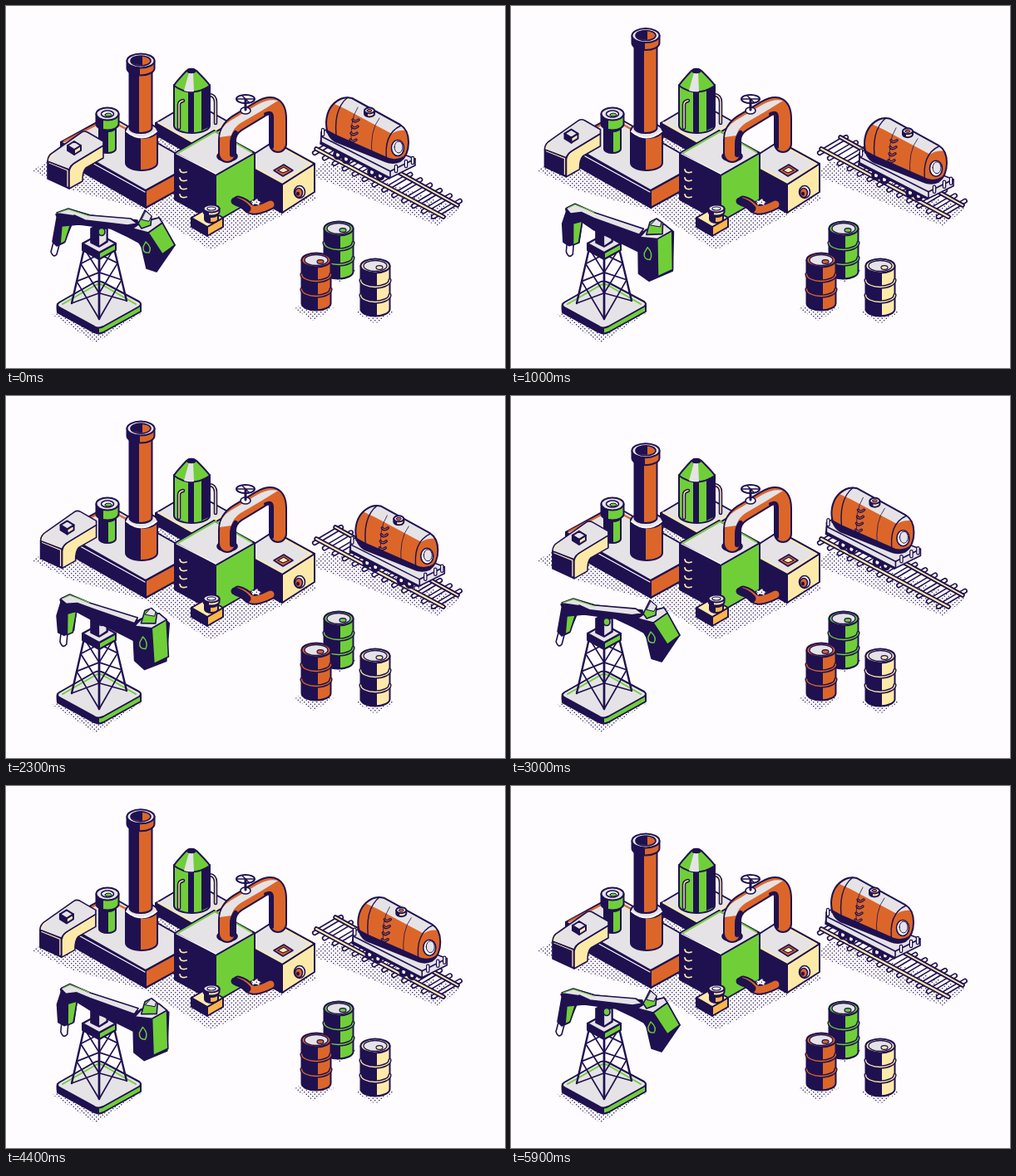
Animation, 600 px wide and 436 px high, one loop 6 s. Source, as an HTML page with a canvas:

```html
<!DOCTYPE html>
<html lang="en">
<head>
<meta charset="utf-8">
<title>Oil industry</title>
<style>
html, body { margin: 0; width: 100%; height: 100%; overflow: hidden; background: #fefcff; }
canvas { display: block; }
</style>
</head>
<body>
<canvas id="stage" width="600" height="436"></canvas>
<script>
const ctx = document.getElementById('stage').getContext('2d');
const BG = '#fefcff', NAVY = '#1f1150', ORANGE = '#dc6629', GREEN = '#70cf38',
      GREY = '#e5e3e6', CREAM = '#fdeaa9', AMBER = '#fbb54a', WHITE = '#fffdfd';
ctx.lineJoin = ctx.lineCap = 'round';

// Drawing helpers
function shape(path, fill, width = 1.6, color = NAVY) {
  const p = new Path2D(path);
  if (fill) { ctx.fillStyle = fill; ctx.fill(p); }
  if (width) { ctx.lineWidth = width; ctx.strokeStyle = color; ctx.stroke(p); }
}
const line = (path, width = 1.6, color = NAVY) => shape(path, null, width, color);

function tube(path, width, color, edge = 4) {
  line(path, width + edge);
  line(path, width, color);
}

function oval(x, y, rx, ry, fill, width = 1.6) {
  shape(`M${x - rx} ${y}a${rx} ${ry} 0 1 0 ${2 * rx} 0a${rx} ${ry} 0 1 0 ${-2 * rx} 0Z`, fill, width);
}

// Upright cylinder, dark from its left edge to x + split
function can(x, top, bottom, rx, ry, color, lid = GREY, split = 0) {
  const dip = bottom + ry * Math.sqrt(1 - (split / rx) ** 2);
  const side = `M${x - rx} ${top}V${bottom}A${rx} ${ry} 0 0 0 `;
  shape(`${side}${x + rx} ${bottom}V${top}Z`, color, 0);
  shape(`${side}${x + split} ${dip}V${top}Z`, NAVY, 0);
  line(`${side}${x + rx} ${bottom}V${top}`, 2);
  oval(x, top, rx, ry, lid, 2);
}

// Isometric box from the left, front and right corners of its top
function box([lx, ly], [fx, fy], [rx, ry], h, right, left = NAVY, top = GREY) {
  shape(`M${lx} ${ly}L${fx} ${fy}v${h}L${lx} ${ly + h}Z`, left, 2);
  shape(`M${rx} ${ry}L${fx} ${fy}v${h}L${rx} ${ry + h}Z`, right, 2);
  shape(`M${lx} ${ly}L${fx} ${fy}L${rx} ${ry}L${lx + rx - fx} ${ly + ry - fy}Z`, top, 2);
}

function at(x, y, draw) {
  ctx.save();
  ctx.translate(x, y);
  draw();
  ctx.restore();
}

// Blend two paths with the same commands
function mix(a, b, f) {
  const number = /-?\d+(\.\d+)?/g, end = b.match(number);
  let i = 0;
  return a.replace(number, v => +v + (end[i++] - v) * f + ' ');
}

const tile = document.createElement('canvas');
tile.width = tile.height = 5;
const dot = tile.getContext('2d');
dot.fillStyle = NAVY;
for (const p of [1.25, 3.75]) {
  dot.beginPath();
  dot.arc(p, p, 0.75, 0, 7);
  dot.fill();
}
const dots = ctx.createPattern(tile, 'repeat');

function shadows() {
  ['M31 198L125 146L340 184L374 232L246 294L168 246L80 222Z',
   'M56 372L110 340L163 370L108 406Z',
   'M364 203L384 186L546 244L520 265Z',
   'M346 365L373 348L394 364L370 379Z',
   'M420 369L444 352L466 369L444 383Z',
   'M378 318L400 305L421 319L400 333Z'].forEach(p => shape(p, dots, 0));
}

function chimney(f) {
  const y = 66 - 32 * f;
  can(163, 150, 189, 19, 9, ORANGE, GREY, -1);
  can(162, y + 10, 147, 13.5, 6, ORANGE, NAVY, -2);
  line('M145 151Q163 166 181 151', 2, WHITE);
  can(162, y, y + 9, 16.5, 8.5, ORANGE, GREY, -1);
  oval(162, y, 12, 6, ORANGE);
  shape(`M150 ${y}a12 6 0 0 1 14 -6v11a12 6 0 0 1 -14 -5Z`, NAVY, 0);
}

function sideBlock() {
  shape('M50 187L76 197V220L50 208Z', NAVY);
  line('M52 189L74 198V217', 1.3, CREAM);
  shape('M76 220V199Q77 192 84 188L117 168V183L96 195Q92 199 92 211Z', CREAM);
  shape('M50 187Q50 180 57 176L91 152Q94 150 98 152L117 163V168L84 188Q77 192 76 197Z', GREY);
  line('M52 186Q53 181 58 178', 1.5, CREAM);
  box([74, 168], [82, 173], [90, 168], 6, CREAM);
}

function storageTank() {
  box([180, 141], [226, 167], [270, 141], 14, CREAM);
  line('M183 140L225 164L266 140', 1.5, CREAM);
  tube('M245 107Q252 108 252 116V141', 1.5, CREAM, 3);
  shape('M202 95V144A21.5 9 0 0 0 245 144V95Z', GREEN, 2);
  shape('M219 100h7v53h-7zM235 98h9v48l-9 4z', NAVY, 0);
  shape('M202 96Q203 93 217 78Q223 74 229 78Q244 93 245 96Q223 111 202 96Z', GREEN, 2);
  shape('M220 80L214 102Q220 104 226 103L225 80Z', GREY, 0);
  oval(223, 78, 5, 2.5, NAVY);
  tube('M208 147V119Q208 115 213 114', 1.5, CREAM, 3);
}

function stub() {
  can(122, 146, 172, 10, 5, GREEN, NAVY, 1);
  can(122, 130, 142, 13.5, 7.5, GREEN, GREY, -5);
  oval(122, 130, 7.5, 4, WHITE);
  oval(123, 131, 4, 2, GREEN, 1);
}

function rightBox() {
  box([283, 188], [332, 215], [371, 190], 34, CREAM);
  line('M300 195L332 212L367 190L325 167', 1.8, CREAM);
  shape('M322 198L334 191L345 198L333 205Z', ORANGE);
  shape('M327 198L334 194L340 198L333 201Z', CREAM, 1.2);
  oval(353, 224, 6.5, 7.5, WHITE);
  oval(352, 225, 4.5, 5.5, ORANGE);
  oval(351, 226, 2, 2.5, NAVY, 0);
}

function plant(f) {
  storageTank();
  box([66, 164], [168, 222], [226, 190], 21, ORANGE);
  line('M70 163L122 136L148 150', 2.5, ORANGE);
  line('M82 177L167 224', 1.2, WHITE);
  chimney(f);
  stub();
  at(-10 * f, -15 * f, sideBlock);
  rightBox();

  box([203, 177], [252, 204], [299, 177], 56, GREEN);
  line('M207 177L252 151L295 176', 2, GREEN);
  line('M205 178L252 202', 1.2, WHITE);
  for (let y = 197; y < 230; y += 10) line(`M209 ${y}q1 5 8 3`, 1.8, CREAM);

  oval(266, 181, 12, 6, NAVY);
  tube('M266 178V162Q266 149 278 141L306 124Q327 112 327 136V166', 18, ORANGE);
  shape('M257 158Q258 145 270 138L302 119Q316 111 327 114L306 127L282 141Q273 147 271 156Z', GREY, 0);
  line('M272 179V166Q272 158 276 153', 6);
  line('M320 170V134Q320 126 312 130', 4);
  oval(288, 126, 6, 4, WHITE);
  line('M288 125V113', 3);
  oval(288, 112, 11, 5, null, 2);
  line('M278 112H298M284 108L292 116', 1.5);

  tube('M279 235Q287 237 292 243Q298 249 318 239', 9, ORANGE);
  line('M275 235Q284 237 290 244', 9);
  line('M296 235l8 4M302 233l-5 6', 1.5, WHITE);

  box([223, 255], [242, 266], [261, 255], 11, AMBER, NAVY, CREAM);
  can(247, 250, 257, 8, 4, AMBER, GREY, -1);
  can(247, 244, 248, 9.5, 4.5, CREAM, GREY, -3);
  oval(247, 244, 5, 2, WHITE, 1.2);
}

function track() {
  for (let i = 0; i < 13; i++) {
    const x = 377 + i * 11.9, y = 174 + i * 6.4;
    tube(`M${x - 6} ${y + 3}L${x + 26} ${y - 16}`, 3, WHITE, 3.2);
  }
  for (const rail of ['M373 172L526 254', 'M396 158L543 240']) {
    line(rail, 5.5);
    line(rail, 2, CREAM);
  }
}

function wagon() {
  for (const [x, y] of [[399, 179], [409, 184], [440, 200], [450, 204]]) {
    oval(x, y, 5, 5.5, NAVY);
    oval(x, y, 2, 2.5, WHITE, 0);
  }
  shape('M379 158L461 200V208L378 166Z', NAVY);
  shape('M379 152L391 146L492 184V192L462 207L379 164Z', GREY);
  line('M379 157L462 199L492 184', 1.6);
  line('M462 199V206', 1.6);
  for (const [x, y] of [[381, 150], [387, 146], [469, 194], [481, 188], [489, 184]])
    tube(`M${x} ${y + 5}v-6`, 2, WHITE, 2.5);

  const tank = 'M385 140Q386 120 402 112Q408 109 416 111L474 143Q484 149 484 164Q484 180 474 187Q465 191 456 187L396 163Q385 157 385 140Z';
  shape(tank, ORANGE, 0);
  shape('M395 118Q406 109 416 111L474 143L481 150Q471 149 464 154L408 124Z', GREY, 0);
  shape('M386 149L397 155L456 181Q464 186 474 183L480 180Q474 193 456 187L396 163Q387 158 386 149Z', NAVY, 0);
  line('M411 110Q392 125 398 164M475 144Q453 154 458 188', 1.4);
  line('M423 122Q412 139 416 170M449 135Q437 150 440 181', 0.8);
  line(tank, 2);
  oval(471, 171, 7.5, 9.5, WHITE);
  oval(472, 170, 5, 7, GREY, 1);
  for (let i = 0; i < 4; i++) tube(`M${424 - i} ${137 + i * 8}q-5 4 -7 0`, 1, ORANGE, 2.4);
  can(437, 126, 130, 6, 3.5, CREAM, WHITE, -2);
  oval(437, 126, 3, 1.6, ORANGE, 1);
}

function barrel(x, y, color) {
  can(x, y, y + 52, 17.5, 8.5, color, color, 2);
  for (const dy of [17, 35]) {
    const ring = `M${x - 17.5} ${y + dy}a17.5 8.5 0 0 0 35 0`;
    line(ring, 4.2);
    line(ring, 1.3, color);
  }
  oval(x, y, 14, 6.5, GREY, 1.3);
  oval(x + 5, y + 2, 4, 2.4, color, 1.2);
}

function tower() {
  shape('M62 359Q61 361 62 369L106 393Q111 396 117 393L162 368V359Z', GREEN, 2);
  shape('M62 360V369L106 393Q109 395 112 395V387Z', NAVY, 0);
  shape('M64 357L106 333Q111 330 117 333L160 356Q164 359 160 362L117 386Q111 389 106 386L64 363Q60 360 64 357Z', GREY, 2);
  line('M68 359L108 336Q112 334 116 336L156 359', 2, GREEN);

  // Legs run from cap to base, with crossed braces in each tier
  const leg = (x1, y1, x2, y2) => k => `${x1 + (x2 - x1) * k} ${y1 + (y2 - y1) * k}`;
  const middle = leg(112, 299, 112, 377), tiers = [0, 0.28, 0.6, 1];
  for (const outer of [leg(94, 292, 79, 358), leg(130, 292, 145, 355)]) {
    line(`M${outer(0)}L${outer(1)}M${middle(0)}L${middle(1)}`, 2.4);
    for (let i = 0; i < 3; i++) {
      const a = tiers[i], b = tiers[i + 1];
      line(`M${outer(a)}L${middle(b)}M${middle(a)}L${outer(b)}`, 1.7);
    }
  }

  box([92, 286], [112, 297], [132, 286], 8, GREEN);
  shape('M102 285V268L112 263L122 269V284L112 290Z', NAVY);
  shape('M112 273L121 268V283L112 289Z', GREY, 1);
  oval(115, 272, 4, 4.5, GREEN);
}

const pumpParts = [
  ['M58 281L54 296Q57 304 61 299L65 284Z', 'M68 282L67 296Q70 305 75 299L76 283Z', WHITE],
  ['M62 250L56 284L61 289L70 285L79 263L75 249Z', 'M68 244L62 261L63 284L70 289L82 286L86 262L80 248Z', NAVY],
  ['M67 264L79 259L71 284L65 287Z', 'M75 262L86 259L82 285L75 288Z', GREEN],
  ['M60 251L76 245L101 252L158 258L160 285L147 278L126 268L88 263L67 265Z',
   'M66 244L78 239L100 249L160 273L156 298L128 284L97 269L84 259L70 259Z', NAVY],
  ['M61 249L75 244L101 252L150 256L158 262L146 264L95 258L82 252L70 255Z',
   'M67 243L77 238L102 249L160 269L154 276L97 255L84 248L72 250Z', GREY],
  ['M150 268L160 260L184 255L203 288L181 320L169 316L163 290Z',
   'M153 278L162 270L184 263L195 271L195 319L166 332L153 324Z', NAVY],
  ['M171 273L188 261L203 288L188 299Z', 'M176 281L194 271L194 319L176 327Z', GREEN],
  ['M152 268L162 261L184 255L188 261L171 273Z', 'M155 279L163 270L184 263L194 271L176 281Z', GREY],
  ['M159 262L167 246L175 253L174 264L163 268Z', 'M163 276L167 261L175 256L183 261L183 275Z', GREEN],
  ['M163 257L168 247L175 253L172 259Z', 'M168 264L175 257L181 261L180 266Z', GREY, 1],
  ['M168 284Q176 291 172 297Q164 298 165 290Z', 'M164 291Q171 298 167 306Q159 306 160 298Z', NAVY, 1.4, GREEN]
];

function pump(f) {
  tower();
  for (const [low, high, ...paint] of pumpParts) shape(mix(low, high, f), ...paint);
  line(mix('M63 249L75 245L100 253', 'M69 243L77 239L100 248', f), 1.2, GREEN);
}

// Strokes start quickly and end softly in the first pair, the reverse in the second
function travel(ms) {
  const p = (ms - 45 + 6000) % 6000, leg = Math.floor(p / 1500), x = p % 1500 / 1500;
  const ease = v => v ** 4 * (3 - 2 * v * v);
  return [1 - ease(1 - x), 1 - ease(x), ease(x), ease(1 - x)][leg];
}

function render() {
  const f = travel(Math.floor(performance.now() / 100) * 100 % 6000);
  ctx.fillStyle = BG;
  ctx.fillRect(0, 0, 600, 436);
  shadows();
  plant(f);
  track();
  at(42 * f, 26 * f, wagon);
  barrel(400, 268, GREEN);
  barrel(373, 306, ORANGE);
  barrel(444, 313, CREAM);
  pump(f);
  requestAnimationFrame(render);
}
render();
</script>
</body>
</html>
```
